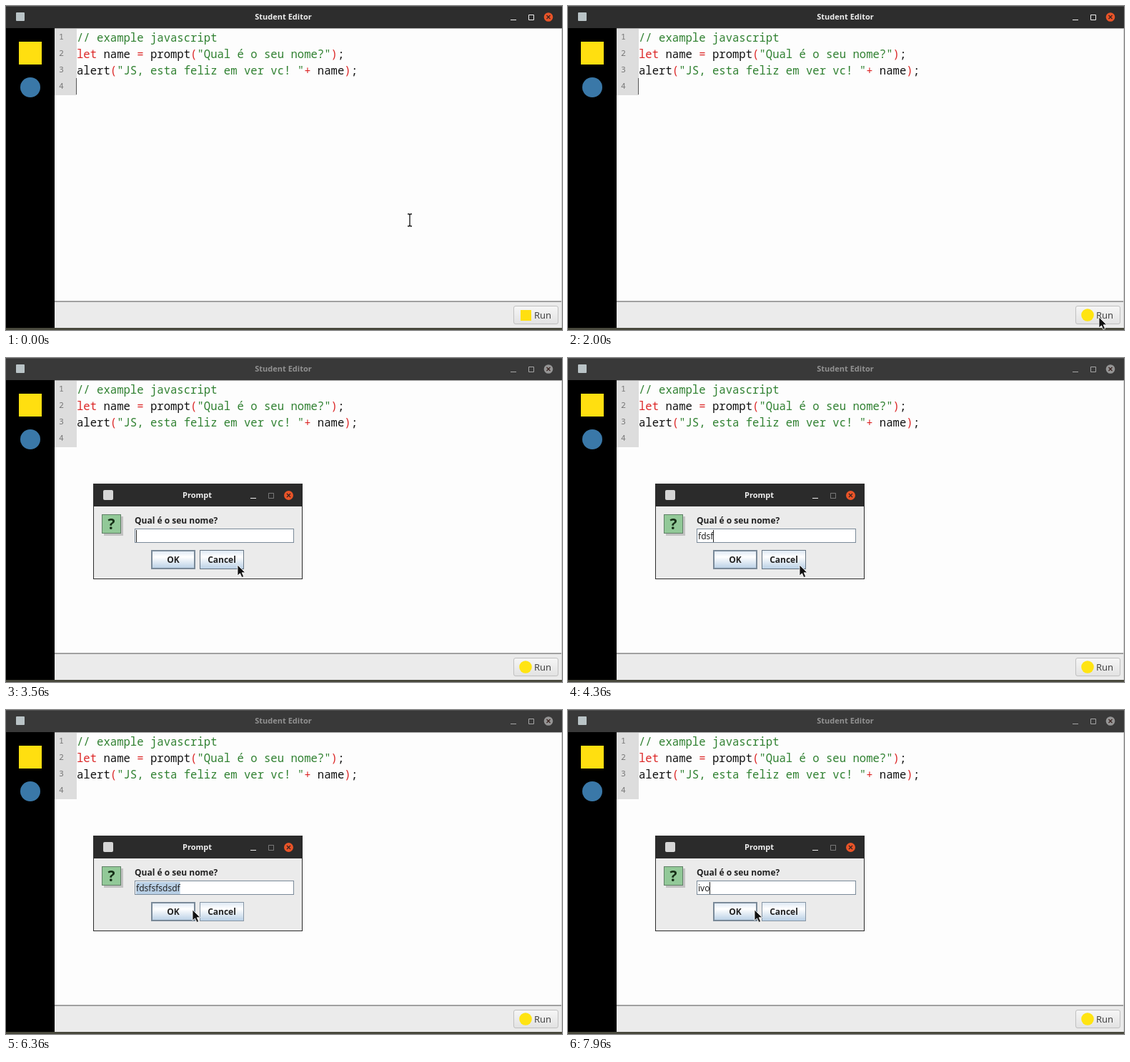
These frames come from a looping animation (778x454 px, 8000 ms). An HTML page:

```html
<!DOCTYPE html>
<html lang="en">
<head>
<meta charset="utf-8">
<title>Student Editor</title>
<style>
html, body { margin: 0; width: 778px; height: 454px; overflow: hidden; background: #000 }
svg { display: block }
text { font: 12px "Noto Sans", sans-serif; fill: #222; white-space: pre }
.bold { font-weight: 700 }
.mid { text-anchor: middle }
.bar { font-size: 11px; font-weight: 700; fill: #eee }
.code text { font: 15.6px "Noto Sans Mono", monospace; fill: #111 }
.code .g { fill: #2f8030 }
.code .r { fill: #dc2626 }
.gutter text { font: 11.5px "Noto Sans Mono", monospace; fill: #777 }
.line { fill: none; stroke: #eee }
.close { fill: #e95428 }
.inactive .bar { fill: #919191 }
.inactive .line { stroke: #a5a5a5 }
.inactive .close { fill: #959595 }
</style>
</head>
<body>
<svg width="778" height="454" viewBox="0 0 778 454">
  <defs>
    <linearGradient id="btn" x2="0" y2="1">
      <stop stop-color="#dde8f3"/><stop offset=".35" stop-color="#fff"/><stop offset="1" stop-color="#b8cfe5"/>
    </linearGradient>
    <linearGradient id="run" x2="0" y2="1">
      <stop stop-color="#f6f6f6"/><stop offset="1" stop-color="#e2e2e2"/>
    </linearGradient>
  </defs>

  <g id="top">
    <rect id="topBar" width="778" height="31"/>
    <path d="M0 .5H778" stroke="#505050"/>
    <rect x="14" y="9" width="12" height="12" rx="1" fill="#b9c3c6"/>
    <text class="bar mid" x="388" y="19">Student Editor</text>
    <path class="line" d="M706 19.5h8M731.5 12.5h7v7h-7z"/>
    <circle class="close" cx="759" cy="15.5" r="6.3"/>
    <path d="M756.5 13l5 5m0-5l-5 5" stroke="#3a2420" stroke-width="1.3"/>
  </g>

  <rect y="31" width="68" height="420"/>
  <rect x="18" y="50" width="32" height="32" fill="#ffdf10"/>
  <circle cx="34" cy="114" r="14" fill="#3a78a8"/>

  <rect x="68" y="31" width="710" height="383" fill="#fdfdfd"/>
  <path d="M68 31.5H778" stroke="#aaa"/>
  <rect x="68" y="32" width="31" height="93" fill="#dddddd"/>
  <g class="gutter">
    <text x="74" y="47">1</text><text x="74" y="70">2</text>
    <text x="74" y="93">3</text><text x="74" y="116">4</text>
  </g>
  <g class="code">
    <text x="99" y="50" class="g">// example javascript</text>
    <text x="99" y="73"><tspan class="r">let</tspan> name <tspan class="r">=</tspan> prompt<tspan class="r">(</tspan><tspan class="g">"Qual é o seu nome?"</tspan><tspan class="r">)</tspan>;</text>
    <text x="99" y="96">alert<tspan class="r">(</tspan><tspan class="g">"JS, esta feliz em ver vc! "</tspan><tspan class="r">+</tspan> name<tspan class="r">)</tspan>;</text>
  </g>
  <path id="editCaret" d="M98.5 101V124" stroke="#555"/>

  <rect x="68" y="414" width="710" height="37" fill="#ebebeb"/>
  <path d="M68 414H778" stroke="#858585" stroke-width="1.5"/>
  <path d="M777.5 32V451" stroke="#d0d0d0"/>
  <rect y="451" width="778" height="3" fill="#48483c"/>
  <rect x="710.5" y="420.5" width="62" height="25" rx="2.5" fill="url(#run)" stroke="#c0c0c0"/>
  <rect id="idle" x="720" y="426" width="15" height="15" fill="#ffdf10"/>
  <circle id="busy" cx="727" cy="433" r="8.8" fill="#ffe412"/>
  <text x="739" y="438" style="font-size:13px;fill:#444">Run</text>

  <g id="dialog">
    <rect x="122.5" y="176.5" width="292" height="133" fill="#ebebeb" stroke="#2b2b2b"/>
    <rect x="122" y="176" width="293" height="32" fill="#2b2b2b"/>
    <rect x="136" y="185" width="14" height="14" rx="2" fill="#d6d6d6"/>
    <text class="bar mid" x="267.5" y="196">Prompt</text>
    <path class="line" d="M342 196.5h8"/>
    <path class="line" d="M367.5 189.5h7v7h-7z" opacity=".4"/>
    <circle class="close" cx="395.5" cy="192.5" r="6.5"/>
    <path d="M393 190l5 5m0-5l-5 5" stroke="#3a2420" stroke-width="1.3"/>
    <rect x="137" y="222" width="27" height="27" fill="#c2c2c2"/>
    <rect x="134.5" y="219.5" width="26" height="26" fill="#92c998" stroke="#5f8066"/>
    <text class="bold mid" x="147.5" y="240" style="font-size:21px;fill:#173017">?</text>
    <text class="bold" x="180" y="232">Qual é o seu nome?</text>
    <rect x="180.5" y="239.5" width="222" height="19" fill="#fff" stroke="#7a8a99"/>
    <rect id="mark" x="182" y="241" height="17" fill="#b8cfe5"/>
    <text id="field" x="182" y="254"></text>
    <path id="caret" d="M.5 241V258" stroke="#222"/>
    <rect x="204" y="270" width="60" height="25" fill="url(#btn)" stroke="#7a8a99" stroke-width="2"/>
    <text class="bold mid" x="234" y="287">OK</text>
    <rect id="cancel" x="271.5" y="269.5" width="61" height="26" fill="url(#btn)"/>
    <text class="bold mid" x="302" y="287">Cancel</text>
  </g>

  <g id="cursor">
    <path id="beam" d="M-3-8.5H-1L0-7.5 1-8.5H3M0-7.5V7.5M-3 8.5H-1L0 7.5 1 8.5H3" fill="none" stroke="#111" stroke-width="1.3"/>
    <path id="arrow" d="M0 0V15L3.5 11.8 6 17.5 8.6 16.3 6.2 10.8H10.8Z" fill="#111" stroke="#fff" stroke-width=".8"/>
  </g>
</svg>
<script>
const $ = id => document.getElementById(id);
const LOOP = 8000, CLICK = 2000, OPEN = 2240, SELECT = 6040;

// time, x, y
const path = [
  [0, 565, 300], [240, 565, 300], [640, 608, 340], [1080, 608, 340],
  [1800, 743, 436], [2400, 743, 436], [2720, 476, 328], [3000, 324, 290],
  [4560, 324, 290], [5040, 261, 280], [LOOP, 261, 280]
];

// time, content of the input
const typed = [[OPEN, ""]];
const type = (word, start, step) =>
  [...word].forEach((_, i) => typed.push([start + i * step, word.slice(0, i + 1)]));
type("fdsfsfsdsdf", 4040, 100);
type("ivo", 7400, 160);

const show = (id, on) => $(id).style.display = on ? "" : "none";
const blink = (t, from) => (t - from) % 1000 < 500;

// speed along one axis at a path point, zero next to a rest
function speed(i, axis) {
  const a = path[i - 1], b = path[i], c = path[i + 1];
  if (!a || !c || a[axis] === b[axis] || b[axis] === c[axis]) return 0;
  return (c[axis] - a[axis]) / (c[0] - a[0]);
}

function cursorAt(t) {
  const i = path.findIndex(p => p[0] > t), a = path[i - 1], b = path[i];
  const span = b[0] - a[0], k = (t - a[0]) / span, j = 1 - k;
  return [1, 2].map(axis =>
    a[axis] * j * j * (1 + 2 * k) + b[axis] * k * k * (1 + 2 * j) +
    span * k * j * (speed(i - 1, axis) * j - speed(i, axis) * k));
}

const inside = (x, y, l, t, r, b) => x >= l && x <= r && y >= t && y <= b;

function draw(t) {
  const open = t >= OPEN, [x, y] = cursorAt(t);
  $("top").setAttribute("class", open ? "inactive" : "");
  $("topBar").setAttribute("fill", open ? "#393939" : "#2d2d2d");
  show("editCaret", !open && blink(t, 0));
  show("idle", t < CLICK);
  show("busy", t >= CLICK);

  show("dialog", open);
  if (open) {
    const [since, text] = typed.filter(s => s[0] <= t).pop();
    const field = $("field");
    field.textContent = text;
    const width = text ? field.getComputedTextLength() : 0;
    const marked = t >= SELECT && text.length > 3;
    $("mark").setAttribute("width", marked ? width : 0);
    $("caret").setAttribute("transform", `translate(${Math.round(182 + width)})`);
    show("caret", !marked && blink(t, since));
    $("cancel").setAttribute("stroke", inside(x, y, 271, 269, 333, 296) ? "#667583" : "#8796a5");
  }

  const arrow = y > 414 || open && inside(x, y, 122, 176, 415, 310);
  show("arrow", arrow);
  show("beam", !arrow);
  $("cursor").setAttribute("transform", `translate(${Math.round(x)} ${Math.round(y)})`);
}

const start = performance.now();
function tick() {
  const t = (performance.now() - start) % LOOP;
  draw(Math.floor(t / 40) * 40);
  requestAnimationFrame(tick);
}
tick();
</script>
</body>
</html>
```
